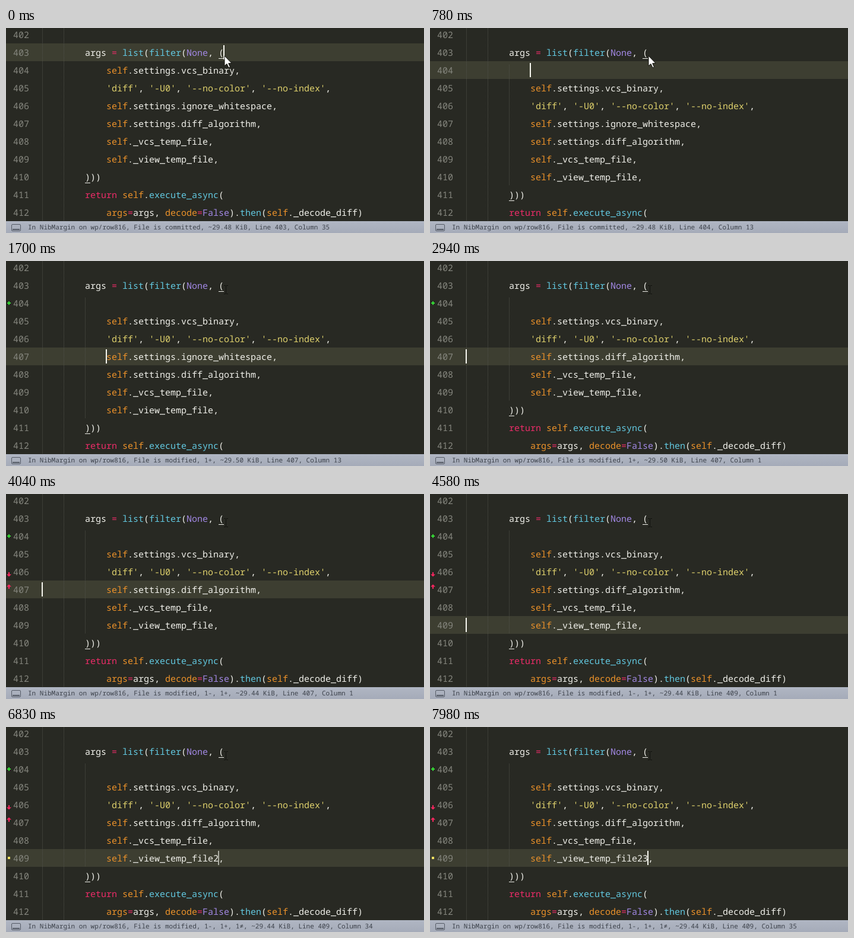
Recreate the animation shown at these times as an HTML page with a canvas. Size 704 px wide and 346 px high, loop 8000 ms.

```html
<!DOCTYPE html>
<html lang="en">
<head>
<meta charset="utf-8">
<title>Code editor</title>
<style>
  html, body { margin: 0; width: 100%; height: 100%; overflow: hidden; background: #282923; }
  canvas { display: block; }
</style>
</head>
<body>
<canvas id="stage" width="704" height="346"></canvas>
<script>
const ctx = document.getElementById('stage').getContext('2d');
const LOOP = 8000, ROW = 30, CELL = 9, CODE_X = 61, FIRST_LINE = 402;
const MONO = '"Roboto Mono", "Noto Sans Mono", "DejaVu Sans Mono", monospace';
const COLOR = {
  back: '#282923', active: '#3d3e31', number: '#85867e', guide: '#50514a',
  text: '#f0f0ea', call: '#62c8e0', operator: '#ec2c68', constant: '#a288e4',
  self: '#ec922a', string: '#ded06c', added: '#35dc35', removed: '#f92660',
  changed: '#f0e060', status: '#3d424b'
};
const TOKENS = [
  ['string', /'[^']*'/], ['self', /self|(?:args|decode)(?==)/],
  ['constant', /None|False/], ['operator', /=|return/],
  ['call', /list|filter|execute_async|then/], ['text', /[\w-]+|./]
].map(([kind, re]) => `(?<${kind}>${re.source})`).join('|');

// Caret moves: time, row, column
const MOVES = [
  [0, 1, 34], [780, 2, 12], [1310, 3, 12], [1540, 4, 12], [1700, 5, 12],
  [2940, 5, 0], [4200, 6, 0], [4580, 7, 0], [5210, 7, 33], [5820, 7, 32],
  [6280, 7, 33], [6910, 7, 34]
];
// Caret fades: time, number of steps, opacity at the end
const FADES = [
  [240, 5, 0], [1160, 5, 0], [2170, 4, 0], [2630, 4, 1], [3330, 5, 0],
  [3800, 4, 1], [4900, 5, 0], [5590, 5, 0], [6200, 5, 0], [6680, 5, 0],
  [7210, 5, 0], [7750, 4, 1]
];

const latest = (list, t) => list.filter(item => item[0] <= t).pop();
const rowTop = row => row * ROW - 4;

function rect(color, x, y, w, h) {
  ctx.fillStyle = color;
  ctx.fillRect(x, y, w, h);
}

function polygon(color, points) {
  ctx.fillStyle = color;
  ctx.beginPath();
  points.forEach(([x, y]) => ctx.lineTo(x, y));
  ctx.closePath();
  ctx.fill();
}

function write(text, x, y, color, size = 15) {
  ctx.font = `${size}px ${MONO}`;
  ctx.textRendering = 'geometricPrecision';
  ctx.fillStyle = color;
  ctx.fillText(text, x, y);
}

function codeLines(t) {
  const inner = ' '.repeat(12), outer = ' '.repeat(8);
  const suffix = t >= 6910 ? '23' : t >= 6280 ? '2' : '';
  return [
    '',
    outer + 'args = list(filter(None, (',
    ...(t >= 780 ? [''] : []),
    inner + 'self.settings.vcs_binary,',
    inner + "'diff', '-U0', '--no-color', '--no-index',",
    ...(t < 2940 ? [inner + 'self.settings.ignore_whitespace,'] : []),
    inner + 'self.settings.diff_algorithm,',
    inner + 'self._vcs_temp_file,',
    inner + `self._view_temp_file${suffix},`,
    outer + ')))',
    outer + 'return self.execute_async(',
    inner + 'args=args, decode=False).then(self._decode_diff)'
  ].slice(0, 11);
}

function drawCode(line, row) {
  const base = rowTop(row) + 21;
  write(String(FIRST_LINE + row), 12, base, COLOR.number);
  for (const match of line.matchAll(new RegExp(TOKENS, 'g'))) {
    if (match[0] === ' ') continue;
    const kind = Object.keys(match.groups).find(key => match.groups[key]);
    write(match[0], CODE_X + match.index * CELL, base, COLOR[kind]);
  }
}

function drawGuide(x, top, bottom) {
  for (let y = top; y < bottom; y += 2) rect(COLOR.guide, x, y, 1, 1);
}

function drawMarkers(t) {
  if (t >= 930) {
    rect(COLOR.added, 2, 70, 6, 2);
    rect(COLOR.added, 4, 68, 2, 6);
  }
  if (t >= 3090) {
    for (const [tip, dir] of [[139.5, -1], [152.5, 1]]) {
      polygon(COLOR.removed, [[5, tip], [9, tip + dir * 4], [1, tip + dir * 4]]);
      rect(COLOR.removed, 4, tip + dir * 5.5 - 2, 2, 4);
    }
  }
  if (t >= 6510) rect(COLOR.changed, 3, 219, 4, 4);
}

function caretOpacity(t, moved) {
  const fade = latest(FADES, t);
  if (!fade || fade[0] < moved) return 1;
  const [start, steps, end] = fade;
  const part = Math.min(1, (Math.floor((t - start) / 76) + 1) / steps);
  return end ? part : 1 - part;
}

function drawPointer(t) {
  if (t < 930) {
    const shape = [[368, 47], [368, 64], [372, 60.5], [375, 67], [377.5, 66], [374.7, 59.7], [380, 59.5]];
    polygon('#fff', shape);
    ctx.strokeStyle = '#15150f';
    ctx.lineWidth = 1;
    ctx.stroke();
  } else {
    const ink = '#11120e';
    rect(ink, 370, 42, 1, 13);
    for (const y of [41, 55]) {
      rect(ink, 367, y, 3, 1);
      rect(ink, 371, y, 3, 1);
    }
  }
}

function drawStatus(t, row, col) {
  const shade = ctx.createLinearGradient(0, 326, 0, 346);
  shade.addColorStop(0, '#b0b6c3');
  shade.addColorStop(1, '#a5abb9');
  rect(shade, 0, 326, 704, 20);

  ctx.strokeStyle = '#555b66';
  ctx.lineWidth = 1;
  ctx.beginPath();
  ctx.roundRect(9.5, 331.5, 15, 11, 1.5);
  ctx.stroke();
  rect('#555b66', 11, 339, 12, 2);

  let state = 'committed, ~29.48';
  if (t >= 1010) state = 'modified, 1+, ~29.50';
  if (t >= 3170) state = 'modified, 1-, 1+, ~29.44';
  if (t >= 6510) state = 'modified, 1-, 1+, 1≠, ~29.44';
  write(`In NibMargin on wp/row816, File is ${state} KiB, Line ${FIRST_LINE + row}, Column ${col + 1}`,
    37, 340, COLOR.status, 11);
}

function draw(t) {
  const [moved, row, col] = latest(MOVES, t);
  const lines = codeLines(t);
  const closing = lines.findIndex(line => line.endsWith(')))'));

  rect(COLOR.back, 0, 0, 704, 346);
  rect(COLOR.active, 0, rowTop(row), 704, ROW);
  drawGuide(61, 0, 326);
  drawGuide(97, 0, 326);
  if (t >= 780) drawGuide(133, rowTop(2) + 6, rowTop(closing));

  lines.forEach(drawCode);
  rect(COLOR.text, 358, rowTop(1) + 25, CELL, 1);
  rect(COLOR.text, 133, rowTop(closing) + 25, CELL, 1);
  drawMarkers(t);

  ctx.globalAlpha = caretOpacity(t, moved);
  rect('#f8f8f0', CODE_X + col * CELL - 1, rowTop(row) + 3, 2, 24);
  ctx.globalAlpha = 1;
  drawPointer(t);
  drawStatus(t, row, col);
}

const begin = performance.now();
function tick() {
  draw((performance.now() - begin) % LOOP);
  requestAnimationFrame(tick);
}
tick();
</script>
</body>
</html>
```
